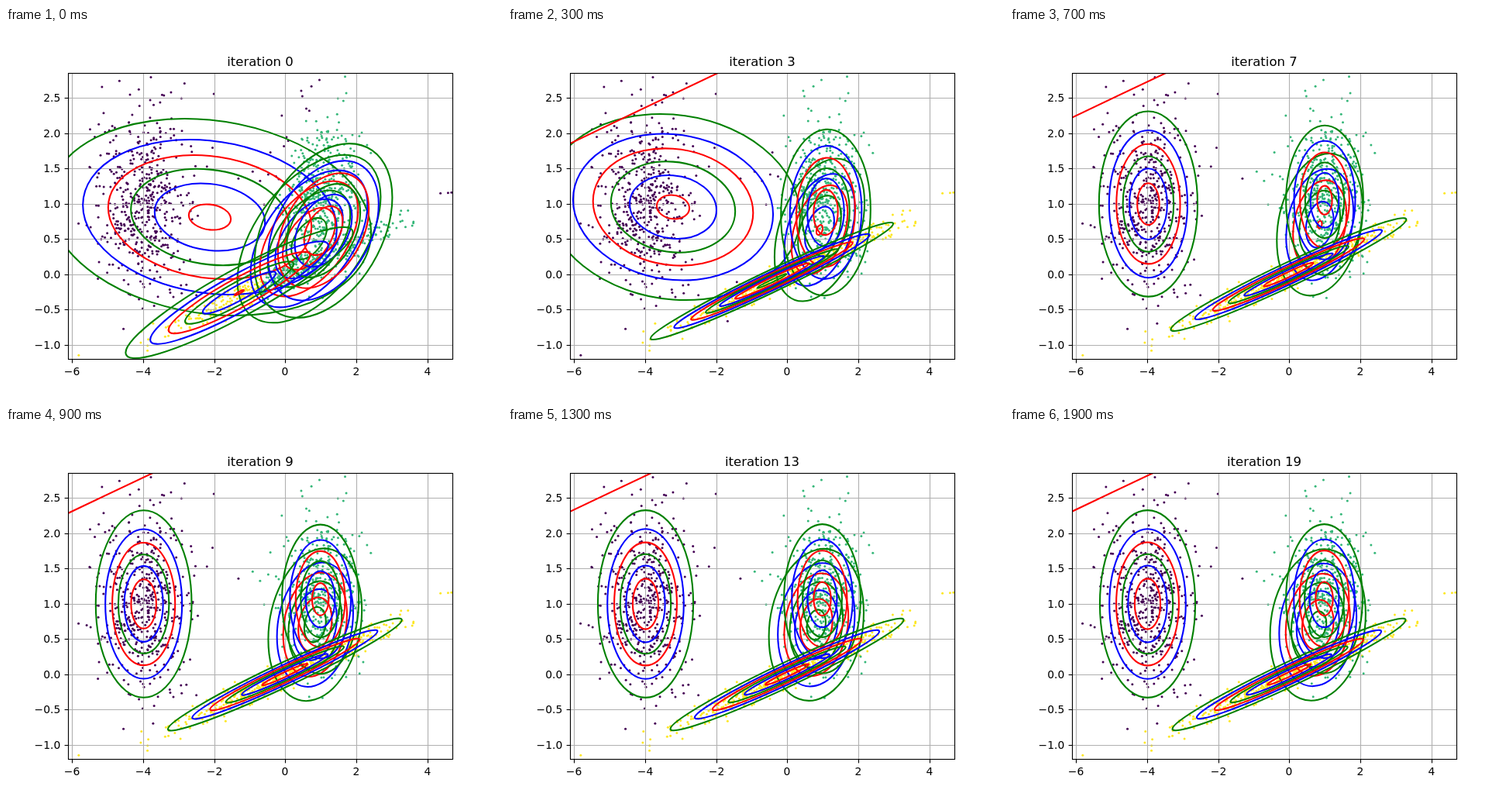
An HTML page with a canvas for the animation above (2 s loop, 640 by 480 pixels).

```html
<!DOCTYPE html>
<html lang="en">
<head>
<meta charset="utf-8">
<title>Mixture fit</title>
<style>
  html, body { margin: 0; width: 100%; height: 100%; overflow: hidden; background: #fff; }
  canvas, svg { position: absolute; left: 0; top: 0; width: 640px; height: 480px; }
  text { font-family: "DejaVu Sans", sans-serif; font-size: 13.89px; }
  #title { font-size: 16.5px; }
</style>
</head>
<body>
<canvas id="plot" width="640" height="480"></canvas>
<svg id="labels" viewBox="0 0 640 480"><text id="title" x="328" y="49" text-anchor="middle"></text></svg>
<script>
const ctx = document.getElementById('plot').getContext('2d');
const labels = document.getElementById('labels');
const title = document.getElementById('title');

const STEP_MS = 100, STEPS = 20, POINTS_PER_CLOUD = 500;
const UNIT_X = 45.9, UNIT_Y = 91, ORIGIN_X = 360.4, ORIGIN_Y = 317.9;
const BOX = { left: 80.5, top: 58.5, right: 576.5, bottom: 427.5 };
const LEVEL_COLORS = ['#ff0000', '#008000', '#0000ff'];
const NICE_STEPS = [1, 1.5, 2, 2.5, 3, 4, 5, 6, 8, 10];
const UNDERFLOW = 1490; // squared distance at which the density becomes zero
const POSE_AT = [0, 3, 5];

// A pose is centre x, y, sigma x, y, correlation. Poses are reached at POSE_AT;
// from the last but one, the component settles exponentially into the last.
const left = {
  color: '#440154', weight: [.33, .38], settle: 1.1,
  poses: [[263, 244, 109, 66.5, .155], [213, 231, 85.9, 62.9, .1], [177.5, 227, 31.3, 61.5, 0]]
};
const spare = {
  color: '#31688e', weight: [.03, .03], settle: 5,
  poses: [[391, 272, 45.4, 53.2, -.5], [402, 260.5, 30.6, 48.5, -.38],
    [401, 253.5, 28.4, 48.2, -.27], [397, 254, 30.9, 48.8, -.13]]
};
const right = {
  color: '#35b779', weight: [.5, .32], settle: 1.8,
  poses: [[409.5, 261.5, 45.1, 57, -.38], [410, 238, 29.4, 54.5, -.04], [405.5, 220.3, 25.4, 49.5, 0]]
};
const band = {
  color: '#fde725', weight: [.06, .27], settle: 1.65,
  poses: [[301, 341.5, 77.4, 44.6, -.9165], [340.5, 326.5, 78.8, 38, -.97866],
    [358, 318.5, 79.3, 37.9, -.97666], [360, 318, 78.1, 37.5, -.97163]]
};
const components = [left, spare, right, band];

const mix = (a, b, f) => a + (b - a) * f;

function stateAt({ poses, settle, weight }, n) {
  const last = poses.length - 2;
  let i = POSE_AT.findIndex((at, k) => k === last || n < POSE_AT[k + 1]);
  const f = i === last
    ? 1 - Math.exp((POSE_AT[i] - n) / settle)
    : (n - POSE_AT[i]) / (POSE_AT[i + 1] - POSE_AT[i]);
  const [x, y, sx, sy, rho] = poses[i].map((v, k) => mix(v, poses[i + 1][k], f));
  return {
    x, y, sx, sy, rho,
    narrow: Math.sqrt(1 - rho * rho),
    weight: mix(...weight, Math.min(n / POSE_AT[1], 1))
  };
}

let seed = 4711;
function random() {
  seed = (seed + 0x6d2b79f5) | 0;
  let t = Math.imul(seed ^ (seed >>> 15), 1 | seed);
  t = (t + Math.imul(t ^ (t >>> 7), 61 | t)) ^ t;
  return (((t ^ (t >>> 14)) >>> 0) + .5) / 4294967296;
}

// Normally distributed points around the pose a component ends in
function cloud({ poses }) {
  const [x, y, sx, sy, rho] = poses[poses.length - 1];
  return Array.from({ length: POINTS_PER_CLOUD }, () => {
    const r = Math.sqrt(-2 * Math.log(random())), angle = random() * 2 * Math.PI;
    const u = r * Math.cos(angle), v = r * Math.sin(angle);
    return [x + sx * u, y + sy * (rho * u + Math.sqrt(1 - rho * rho) * v)];
  });
}
const points = [left, right, band].flatMap(cloud);

function score(s, [px, py]) {
  const u = (px - s.x) / s.sx, v = (py - s.y) / s.sy;
  const q = (u * u + v * v - 2 * s.rho * u * v) / (s.narrow * s.narrow);
  return Math.log(s.weight / (s.sx * s.sy * s.narrow)) - q / 2;
}

function drawPoints(states) {
  for (const point of points) {
    const scores = states.map(s => score(s, point));
    ctx.fillStyle = components[scores.indexOf(Math.max(...scores))].color;
    ctx.beginPath();
    ctx.arc(...point, 1.5, 0, 2 * Math.PI);
    ctx.fill();
  }
}

function niceStep(raw) {
  const scale = 10 ** Math.floor(Math.log10(raw));
  return NICE_STEPS.find(m => m * scale >= raw) * scale;
}

// Ellipses of equal density at multiples of a round step
function drawContours(s) {
  const area = (s.sx / UNIT_X) * (s.sy / UNIT_Y) * s.narrow;
  const peak = 1 / (2 * Math.PI * area);
  const ratio = peak / niceStep(peak / 8);
  for (let k = 0; k < ratio; k++) {
    const r = Math.sqrt(k ? 2 * Math.log(ratio / k) : UNDERFLOW);
    ctx.save();
    ctx.transform(s.sx, s.rho * s.sy, 0, s.narrow * s.sy, s.x, s.y);
    ctx.beginPath();
    ctx.arc(0, 0, r, 0, 2 * Math.PI);
    ctx.restore();
    ctx.strokeStyle = LEVEL_COLORS[k % 3];
    ctx.stroke();
  }
}

const snap = v => Math.floor(v + .5) + .5;
function ticks(first, last, step, toPixel) {
  const list = [];
  for (let v = first; v <= last; v += step) list.push({ v, at: snap(toPixel(v)) });
  return list;
}
const xTicks = ticks(-6, 4, 2, v => ORIGIN_X + v * UNIT_X);
const yTicks = ticks(-1, 2.5, .5, v => ORIGIN_Y - v * UNIT_Y);

function line(x1, y1, x2, y2) {
  ctx.beginPath();
  ctx.moveTo(x1, y1);
  ctx.lineTo(x2, y2);
  ctx.stroke();
}

function drawGrid() {
  ctx.strokeStyle = '#b0b0b0';
  ctx.lineWidth = 1.11;
  for (const { at } of xTicks) line(at, BOX.top, at, BOX.bottom);
  for (const { at } of yTicks) line(BOX.left, at, BOX.right, at);
}

function drawFrame() {
  ctx.strokeStyle = '#000';
  ctx.lineWidth = 1.11;
  ctx.strokeRect(BOX.left, BOX.top, BOX.right - BOX.left, BOX.bottom - BOX.top);
  for (const { at } of xTicks) line(at, BOX.bottom, at, BOX.bottom + 4.9);
  for (const { at } of yTicks) line(BOX.left - 4.9, at, BOX.left, at);
}

function addLabel(text, x, y, anchor) {
  const node = document.createElementNS(labels.namespaceURI, 'text');
  node.setAttribute('x', x);
  node.setAttribute('y', y);
  node.setAttribute('text-anchor', anchor);
  node.textContent = text.replace('-', '\u2212');
  labels.append(node);
}
for (const { v, at } of xTicks) addLabel(String(v), at - .5, 448, 'middle');
for (const { v, at } of yTicks) addLabel(v.toFixed(1), 70.3, at + 4.5, 'end');

function draw(n) {
  const states = components.map(c => stateAt(c, n));
  ctx.fillStyle = '#fff';
  ctx.fillRect(0, 0, 640, 480);
  ctx.save();
  ctx.beginPath();
  ctx.rect(BOX.left, BOX.top, BOX.right - BOX.left, BOX.bottom - BOX.top);
  ctx.clip();
  drawPoints(states);
  drawGrid();
  ctx.lineWidth = 2.08;
  states.forEach(drawContours);
  ctx.restore();
  drawFrame();
  title.textContent = 'iteration ' + n;
}

let shown = -1;
const start = performance.now();
function tick() {
  const n = Math.floor((performance.now() - start) / STEP_MS) % STEPS;
  if (n !== shown) draw(shown = n);
  requestAnimationFrame(tick);
}
tick();
</script>
</body>
</html>
```
